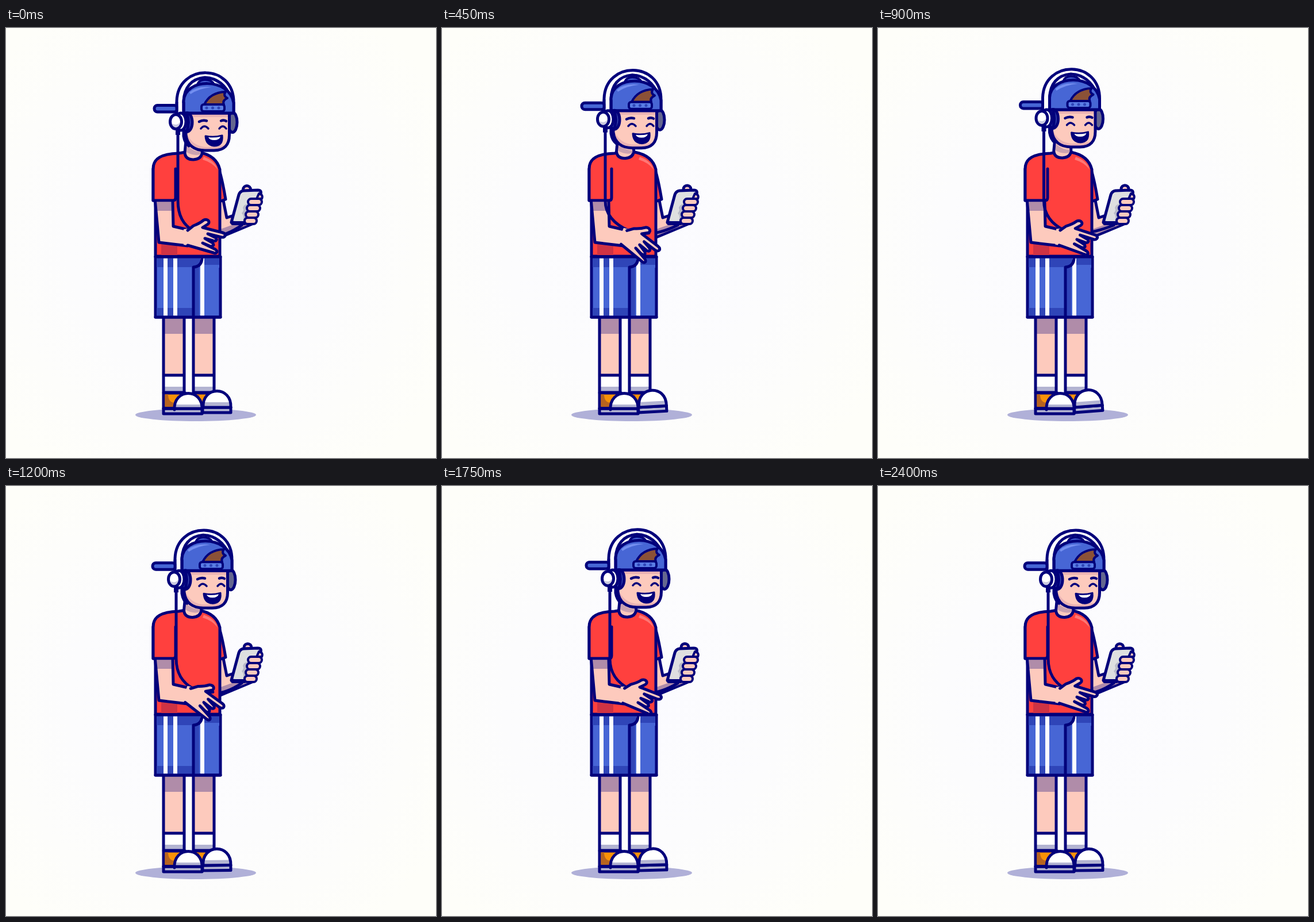
Recreate the animation shown at these times as an HTML page. Size 748x748 px, loop 2.45 s.

```html
<!DOCTYPE html>
<html lang="en">
<head>
<meta charset="utf-8">
<title>Listening to music</title>
<style>
  html, body { margin: 0; width: 100%; height: 100%; overflow: hidden; background: #fdfdfb; }
  svg { display: block; width: 100vw; height: 100vh; }
  .ink { stroke: #02007b; stroke-width: 5; stroke-linejoin: round; stroke-linecap: round; }
  .thin { stroke-width: 4; }
  .line { fill: none; }
  .skin { fill: #fdcabd; }
  .shade { fill: #b08ca9; }
  .red { fill: #ff403e; }
  .blue { fill: #4766d5; }
  .deep { fill: #2f45b8; }
  .white { fill: #fff; }
  .grey { fill: #b3b4d2; }
  .navy { fill: #02007b; }
</style>
</head>
<body>
<svg viewBox="0 0 748 748">
  <defs>
    <radialGradient id="bg" gradientUnits="userSpaceOnUse" cx="350" cy="374" r="480">
      <stop offset="0" stop-color="#fbfbff"/>
      <stop offset=".5" stop-color="#fcfcfd"/>
      <stop offset="1" stop-color="#fefef9"/>
    </radialGradient>
    <path id="jaw" d="M313 146V186C315 204 328 213 346 213H362C380 213 388.500 203 388.500 186V146"/>
    <clipPath id="face"><use href="#jaw"/></clipPath>
    <clipPath id="dome"><path d="M343 661C341 623 393 623 391 661Z"/></clipPath>
    <g id="leg">
      <path class="skin" d="M274 503H310V604H274Z"/>
      <path class="shade" d="M274 503H310V532H274Z"/>
      <path class="white" d="M274 604H310V634H274Z"/>
      <path class="grey" d="M274 624H310V634H274Z"/>
      <path class="ink line" d="M274 503V634H310V503M274 604H310"/>
    </g>
    <g id="toe">
      <path class="white" d="M343 661C341 623 393 623 391 661Z"/>
      <path class="grey" clip-path="url(#dome)" d="M340 652H394V662H340Z"/>
      <path class="ink line" d="M343 661C341 623 393 623 391 661"/>
    </g>
  </defs>

  <rect width="748" height="748" fill="url(#bg)"/>
  <ellipse cx="330" cy="673" rx="105" ry="11" fill="#b0b0d8"/>

  <!-- legs and shoes -->
  <use href="#leg"/>
  <use href="#leg" x="52"/>
  <path class="ink" fill="#f99208" d="M326 635H350V661H326Z"/>
  <path fill="#b8641f" d="M328 637H336Q336 645 340 650L336 659H328Z"/>
  <g id="foot">
    <path class="ink grey" d="M342 660H391V669H342Z"/>
    <use href="#toe" y="-1"/>
    <path class="ink line" d="M342 660H391"/>
  </g>
  <path class="ink" fill="#f99208" d="M274 635H312V661H274Z"/>
  <path fill="#b8641f" d="M276.500 637H282Q282 651 293 652V659H276.500Z"/>
  <path class="ink grey" d="M274 662H341V671H274Z"/>
  <use href="#toe" x="-50" y="3"/>
  <path class="ink line" d="M274 662H341"/>

  <!-- far arm -->
  <path class="ink skin" d="M366 300H378L384 330L396 326L410 328L428 341L373 364Z"/>
  <path class="shade" d="M373 350L395 342H422L374 361Z"/>
  <path class="ink red" d="M370 244Q376 262 382 298L374 301H366Z"/>
  <path id="tail" class="ink line"/>

  <!-- shirt -->
  <path class="ink red" d="M256 245C256 227 270 219 300 218L312 216H336Q366 222 372 246V397H260V300H256Z"/>
  <path fill="#ff7775" d="M344 224Q364 231 368 246Q359 234 342 229Z"/>
  <path fill="#cf3344" d="M270 374H298V395H270Z"/>

  <!-- shorts -->
  <path class="ink blue" d="M260 398H373V503H260Z"/>
  <path class="deep" d="M262 400H371V416H262ZM262 487H325V501H262ZM328 414H336V501H328Z"/>
  <path class="blue" d="M343 412H371V417H336Z"/>
  <path class="white" d="M274 400.500H281V500.500H274ZM291 400.500H298V500.500H291ZM338 400.500H345V500.500H338Z"/>
  <path class="ink line" d="M341 399Q341 415 326 416V503M260 398H373M260 503H373"/>

  <!-- near arm -->
  <path class="skin" d="M259 301H290L291 345L320 352L316 379L266 373Z"/>
  <path class="shade" d="M261 303H289V318H262Z"/>
  <path class="ink line" d="M259.500 302L266 373L316 379M290 302L291 345L317 351"/>
  <path class="red" d="M258 245V299H292V245L282 230Z"/>
  <path class="ink line" d="M256 245V300H291Q295 300 295 295V245"/>

  <!-- phone and its hand -->
  <circle id="thumb" class="ink skin" cx="419" cy="281" r="6.500"/>
  <path class="ink" fill="#dedfe0" d="M392 338L405 290Q407 284 413 283L438 282Q445 282 443 289L418 340Z"/>
  <path fill="#b9bac8" d="M421 306Q413 307 412 313Q415 317 410 322Q415 327 412 335H421Z"/>
  <path class="navy" d="M391 336H416V343H394Q389 342 391 336Z"/>
  <path class="skin" d="M428 298H442L438 334H422Z"/>
  <g class="ink skin thin" id="fingers"></g>

  <!-- neck -->
  <g id="neck">
    <path class="ink skin" d="M313 196L311 217Q312 229 326 229Q340 228 341 217V205Z"/>
    <path class="shade" d="M315 205Q326 215 339 215V219Q329 224 314 216Z" opacity=".65"/>
  </g>

  <path id="cord" class="ink line"/>

  <!-- strumming hand -->
  <g id="hand">
    <path class="skin" d="M309 350L322 348L326 380L309 377Z"/>
    <path class="ink skin" d="M316 352L326 344Q337 340 344 334C351 331 357 338 350 342L342 347L377 356C384 358 382 365 375 364L351 358L363 364C369 367 366 372 360 370L346 366L358 373C364 377 360 381 354 379L342 374L364 385C370 389 366 393 361 391L316 378"/>
  </g>

  <!-- head -->
  <g id="head">
    <ellipse class="ink" cx="394" cy="164" rx="8" ry="17.500" fill="#65678f"/>
    <path class="ink" fill="#7c3d38" d="M309 174V188Q311 200 318 205V174Z"/>
    <use href="#jaw" class="skin"/>
    <g clip-path="url(#face)">
      <path fill="#e3aab0" d="M313 146H389V155H313ZM313 180Q324 209 354 207L389 203V214H313Z" opacity=".75"/>
    </g>
    <use href="#jaw" class="ink line"/>
    <path class="ink line" style="stroke-width:4.500" d="M336 163Q342 159.500 349 161.500M374 161.500Q379 159.500 383 162"/>
    <path class="ink line" style="stroke-width:3.500" d="M339 175Q345 167 352 175M371 175Q377 167 383 175"/>
    <path class="ink navy" style="stroke-width:3" d="M347 188Q362 191 376 187Q378 205 362 205Q348 204 347 188Z"/>
    <path class="white" d="M352 190Q362 191.500 373 189Q371 195 362 195Q354 195 352 190Z"/>

    <!-- headband behind the cap, then the cap -->
    <path class="ink white" d="M297 150V127C299 61 397 61 396 130V148H309Z"/>
    <path fill="#cdd3f6" d="M352 83Q386 90 393 128L380 110Z"/>
    <path class="ink line" d="M309 148V127C310 104 322 88 346 86Q378 88 392 122"/>
    <path class="ink blue thin" d="M333 98Q336 90 346 90Q358 90 362 98Z"/>
    <path class="ink blue" d="M309 148V127C311 86 389 86 396 130V148Z"/>
    <path fill="#748ff0" d="M319 112Q332 100 358 103Q336 105 321 115Z"/>
    <path class="ink thin" fill="#8b5137" d="M345 133Q355 112 382 111Q377 118 385 122Q376 126 379 133Z"/>
    <rect class="ink thin" x="340" y="133" width="40" height="12" rx="4" fill="#5a7de5"/>
    <g class="deep"><circle cx="349" cy="139" r="2.500"/><circle cx="359.500" cy="139" r="2.500"/><circle cx="370" cy="139" r="2.500"/></g>
    <rect class="ink blue" x="258" y="134.500" width="40" height="11.500" rx="5.500"/>
    <path class="white" d="M299.500 130H306.500V150H299.500Z"/>
    <path class="ink line" d="M297 130V150M309 130V148"/>

    <ellipse class="ink" cx="315" cy="164" rx="9" ry="16.500" fill="#3a4ab0"/>
    <path class="ink line" d="M315 150Q320 164 315 178"/>
    <ellipse class="ink white" cx="304" cy="163" rx="9" ry="15"/>
    <ellipse class="ink white" cx="295.500" cy="163" rx="10" ry="12.500"/>
    <path class="grey" d="M288 166Q290 173 296 173Q302 172 302 164Q298 171 288 166Z" opacity=".7"/>
    <path class="navy" d="M295 176H303V186H295Z"/>
  </g>
</svg>
<script>
  const el = id => document.getElementById(id);
  const LOOP = 2450, STEP = 50;

  // knuckles stacked along the phone's edge
  el('fingers').innerHTML = [0, 1, 2, 3].map(i =>
    `<rect x="${421 - i * 2}" y="${297 + i * 11}" width="${24 - i}" height="11" rx="5.500"/>`).join('') +
    '<path d="M440 288Q448 290 445 297H436Z"/>';

  // linear rise from 0 to 1 at `peak`, then linear fall to 0 at `period`
  function ramp(p, period, peak) {
    const q = p % period;
    return q < peak ? q / peak : (period - q) / (period - peak);
  }

  function draw(ms) {
    const p = Math.max(0, Math.floor(ms % LOOP / STEP) - 0.75);
    const beat = ramp(p, 12, 6);
    const dx = -16 * ramp(p, 12, 8);
    const dy = -7 * beat;
    const x = 299 + dx;

    el('head').setAttribute('transform', `translate(${dx} ${dy})`);
    el('neck').setAttribute('transform', `translate(${dx / 2} ${dy / 2})`);
    el('hand').setAttribute('transform', `rotate(${24 * ramp(p, 16, 8)} 318 366)`);
    el('foot').setAttribute('transform', `rotate(${-5 * beat} 342 669)`);
    el('thumb').setAttribute('transform', `translate(${12 * beat} ${-beat})`);
    el('cord').setAttribute('d',
      `M${x} ${180 + dy}V300C${x} 326 ${308 + dx / 2} 342 326 353Q342 359 360 ${359 + dy / 2}`);
    el('tail').setAttribute('d',
      `M350 ${360 + dy / 2}Q376 ${367 + dy * 1.7} 410 343`);
  }

  const start = performance.now();
  function tick() {
    draw(performance.now() - start);
    requestAnimationFrame(tick);
  }
  draw(0);
  requestAnimationFrame(tick);
</script>
</body>
</html>
```
